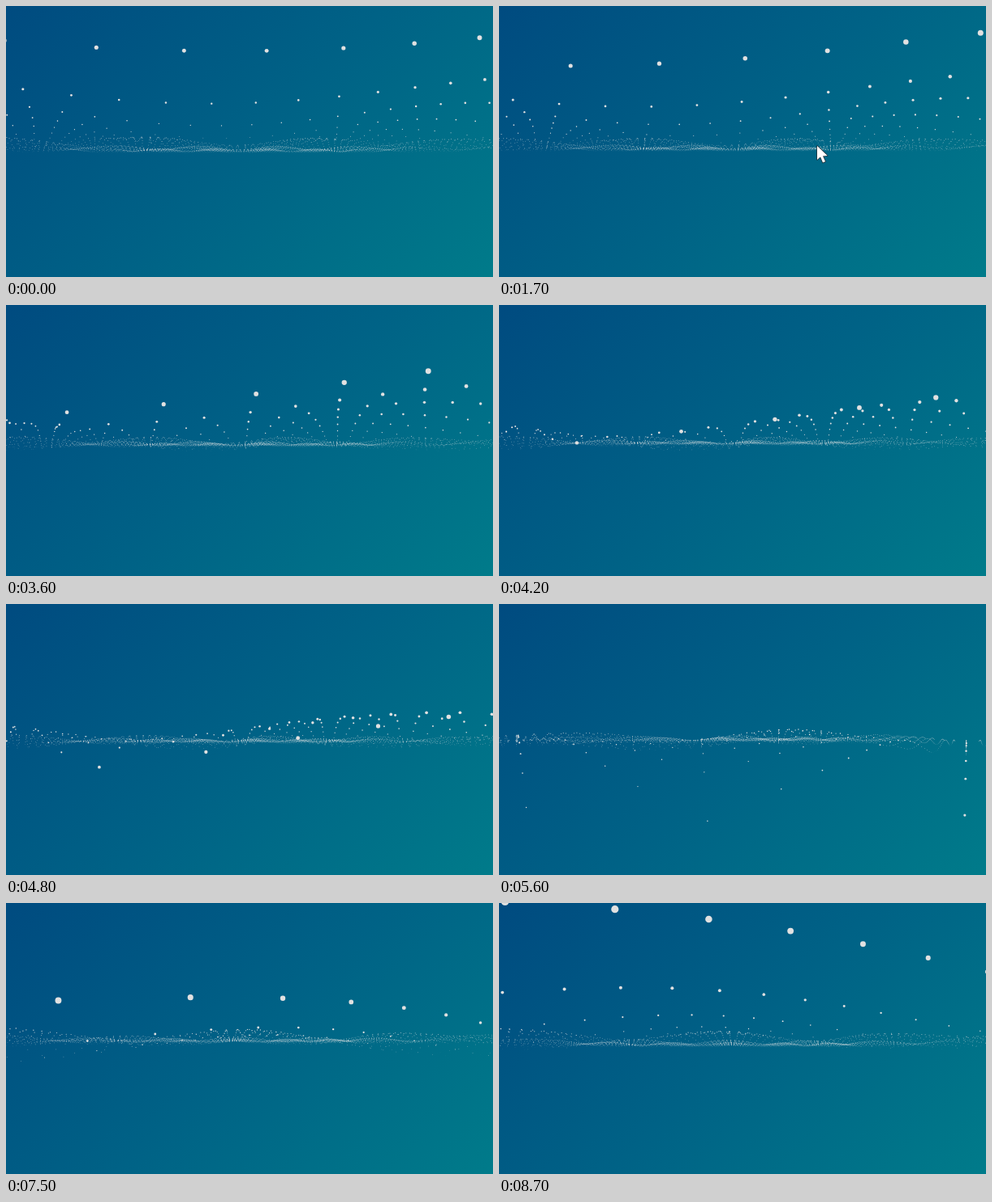
Animation of 600 by 335 pixels, one loop 8800 ms. Source, as an HTML page with a canvas:

```html
<!DOCTYPE html>
<html lang="en">
<head>
<meta charset="utf-8">
<title>Particle waves</title>
<style>
html, body { margin: 0; width: 100%; height: 100%; overflow: hidden; }
body { background: linear-gradient(135deg, #004b80, #006286 50%, #007b8a); }
canvas { display: block; width: 600px; height: 335px; }
</style>
</head>
<body>
<canvas id="stage" width="600" height="335"></canvas>
<script>
const ctx = document.getElementById('stage').getContext('2d');
const LOOP = 8800, STEP = 100;
const W = 600, H = 335;
const FOCAL = 115, MID_X = 296, MID_Y = 169;
const COLS = 100, ROWS = 70, GAP = 100, CAM_Z = 1000;
const EASE = 0.513; // share of the way to the goal per unit of wave count

// The camera glides towards one goal after another while the waves roll on
const begin = { count: 9.05, x: -33.7, y: -124 };
const glides = [
  { end: 1700, rate: 0.59, x: 17, y: -66 },
  { end: 3600, rate: 0.71, x: -22, y: -3 },
  { end: 4800, rate: 1.38, x: -109, y: 15 },
  { end: 6300, rate: 1.85, x: -711, y: 30 },
  { end: 7500, rate: 1.8, x: 28, y: -46 },
  { end: LOOP, rate: 1.38, x: -11, y: -123 }
];
const visits = [
  { start: 300, slide: 1000, end: 3000, from: [432, 184], to: [392, 173] },
  { start: 6100, slide: 700, end: 6800, from: [330, 200], to: [370, 289] }
];
const arrow = new Path2D('M0 0V17L4 13.4L7 20.6L10 19.3L7 12.4L12.6 12Z');

function cameraAt(t) {
  let { count, x, y } = begin, from = 0;
  for (const g of glides) {
    const rolled = g.rate * (Math.min(t, g.end) - from) / 1000;
    const left = Math.exp(-EASE * rolled);
    count += rolled;
    x = g.x + (x - g.x) * left;
    y = g.y + (y - g.y) * left;
    if (t <= g.end) break;
    from = g.end;
  }
  return { count, x, y };
}

function drawDot(x, y, r) {
  if (r < 0.5) {
    // Far specks keep a minimum visible size
    const side = 1.77 * Math.max(r, Math.min(0.3, r * 3));
    ctx.fillRect(x - side / 2, y - side / 2, side, side);
    return;
  }
  ctx.beginPath();
  ctx.arc(x, y, r, 0, Math.PI * 2);
  ctx.fill();
}

function drawWaves(t) {
  const { count, x: cx, y: cy } = cameraAt(t);
  // Camera basis, looking at the origin
  const len = Math.hypot(cx, cy, CAM_Z), flat = Math.hypot(cx, CAM_Z);
  const fx = -cx / len, fy = -cy / len, fz = -CAM_Z / len;
  const rx = CAM_Z / flat, rz = -cx / flat;
  const ux = -rz * fy, uy = rz * fx - rx * fz, uz = rx * fy;

  ctx.fillStyle = '#e1e1e1';
  for (let ix = 0; ix < COLS; ix++) {
    const sx = Math.sin((ix + count) * 0.3);
    const dx = (ix - COLS / 2) * GAP - 5 - cx;
    for (let iy = 0; iy < ROWS; iy++) {
      const sy = Math.sin((iy + count) * 0.5);
      const dy = 50 * (sx + sy) - cy;
      const dz = (iy - ROWS / 2) * GAP - CAM_Z;
      const depth = dx * fx + dy * fy + dz * fz;
      if (depth < 5) continue;
      const k = FOCAL / depth;
      const x = MID_X + k * (dx * rx + dz * rz);
      const y = MID_Y - k * (dx * ux + dy * uy + dz * uz);
      const r = k * 1.2 * (sx + sy + 2);
      if (x < -r || x > W + r || y < -r || y > H + r) continue;
      drawDot(x, y, r);
    }
  }
}

function drawPointer(t) {
  const v = visits.find(v => t >= v.start && t <= v.end);
  if (!v) return;
  const u = Math.min(1, (t - v.start) / v.slide);
  const [x, y] = v.from.map((a, i) => a + (v.to[i] - a) * u);
  ctx.save();
  ctx.translate(x, y);
  ctx.lineJoin = 'round';
  ctx.lineWidth = 1.6;
  ctx.strokeStyle = '#23343c';
  ctx.stroke(arrow);
  ctx.fillStyle = '#fff';
  ctx.fill(arrow);
  ctx.restore();
}

const start = performance.now();
let shown = -1;
function frame() {
  const elapsed = Math.max(0, performance.now() - start) % LOOP;
  const t = Math.floor(elapsed / STEP) * STEP;
  if (t !== shown) {
    shown = t;
    ctx.clearRect(0, 0, W, H);
    drawWaves(t);
    drawPointer(t);
  }
  requestAnimationFrame(frame);
}
frame();
</script>
</body>
</html>
```
